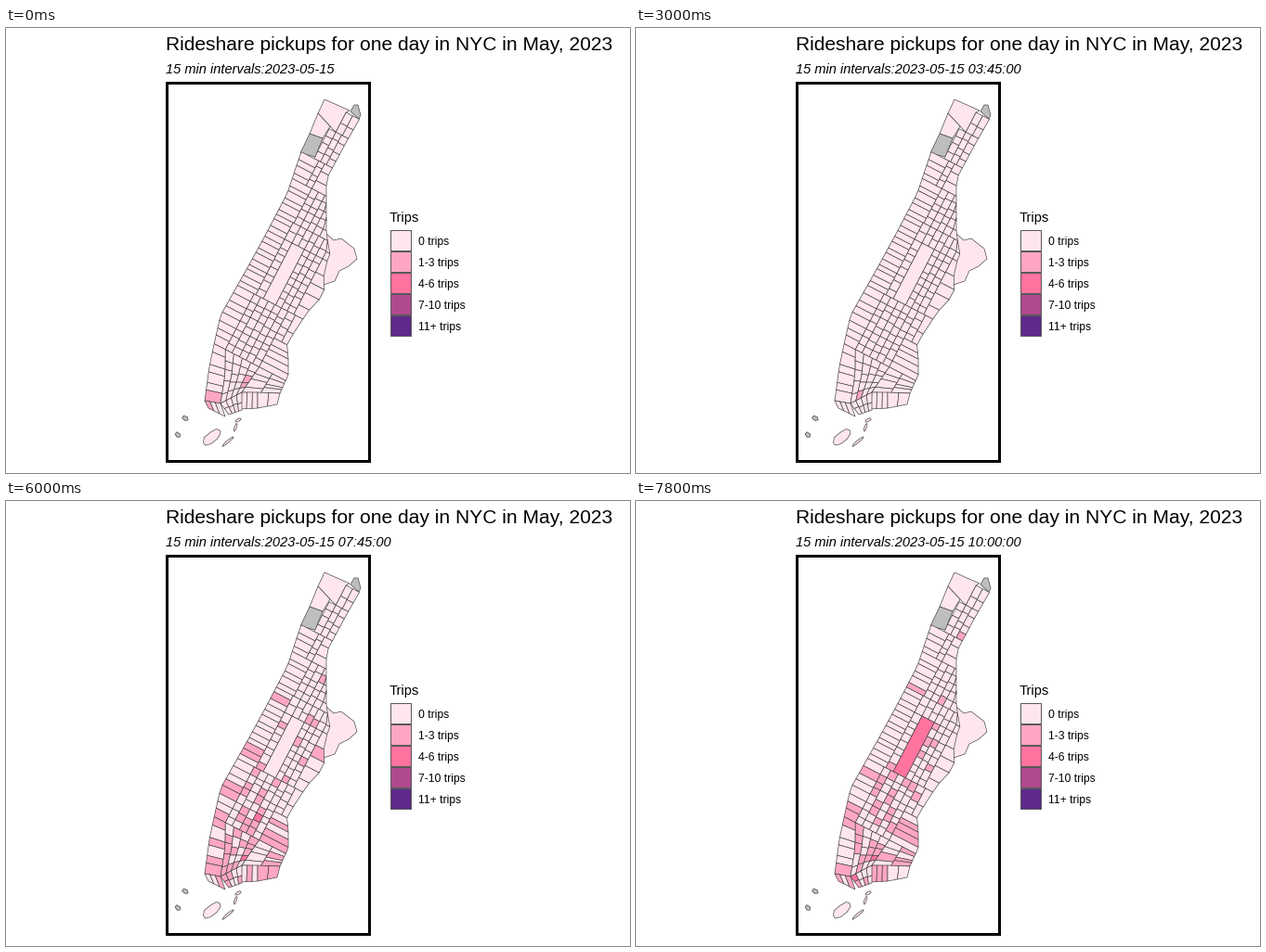
Write a matplotlib script that moves like this. It is 672x480 px and loops after 8 s.

```python
import numpy as np
import matplotlib.pyplot as plt
from matplotlib.animation import FuncAnimation
from matplotlib.collections import PolyCollection
from matplotlib.patches import Rectangle

W, H = 672, 480
FRAMES, STEP_MS = 40, 200
PT = 0.75                      # points per pixel at 96 dpi
FILLS = np.array(["#FFE6ED", "#FFA6C4", "#FF739F", "#B04A8F", "#5F298C", "#BEBEBE"])
LABELS = ["0 trips", "1-3 trips", "4-6 trips", "7-10 trips", "11+ trips"]
BINS = [1, 4, 7, 11]           # lowest trip count of each darker class
GREY = 5

rng = np.random.default_rng(15)
cells, greys = [], []

# Street grid: u runs across the island, v runs downtown.
ORIGIN = np.array([308.0, 232.0])
ACROSS = np.array([0.888, 0.459])
DOWN = np.array([-0.459, 0.888])


def shore(*pts):
    """Turn a shoreline into a function u(v)."""
    rel = np.array(pts) - ORIGIN
    u, v = rel @ ACROSS, rel @ DOWN
    return lambda at: np.interp(at, v, u)


west = shore((343, 77), (327, 114), (317, 136), (303, 178), (280, 222),
             (262, 255), (231, 310), (222, 350), (214, 402))
east = shore((382, 96), (367, 122), (345, 163), (345, 200), (345, 222), (349, 243), (342, 262),
             (343, 287), (325, 306), (306, 335), (301, 345), (304, 352), (304, 375), (295, 394))


def spot(u, v):
    return ORIGIN + u * ACROSS + v * DOWN


def add(pts, grey=False):
    if grey:
        greys.append(len(cells))
    cells.append(np.array(pts, float))


def blob(x, y, rx, ry, tilt, grey=False, sides=9):
    """A slightly uneven ellipse."""
    a = np.linspace(0, 2 * np.pi, sides, endpoint=False)
    r = rng.uniform(0.85, 1.1, sides)
    px, py = rx * r * np.cos(a), ry * r * np.sin(a)
    c, s = np.cos(np.radians(tilt)), np.sin(np.radians(tilt))
    add(np.c_[x + px * c - py * s, y + px * s + py * c], grey)


def breaks(a, b, step):
    """Uneven row limits from a to b."""
    n = max(1, round((b - a) / step))
    rows = np.linspace(a, b, n + 1)
    rows[1:-1] += rng.uniform(-0.2, 0.2, n - 1) * step
    return rows


def edge_at(edge, v):
    return edge(v) if callable(edge) else np.clip(edge, west(v), east(v))


def zone(v0, v1, edges, step=8.2, west_step=6.8, east_step=10):
    for left, right in zip(edges, edges[1:]):
        size = west_step if left is west else east_step if right is east else step
        rows = breaks(v0, v1, size)
        for a, b in zip(rows, rows[1:]):
            la, lb = edge_at(left, a), edge_at(left, b)
            ra, rb = edge_at(right, a), edge_at(right, b)
            if max(ra - la, rb - lb) > 1.5:
                add([spot(la, a), spot(ra, a), spot(rb, b), spot(lb, b)])


def along(pts, t):
    pts = np.array(pts, float)
    s = np.r_[0, np.cumsum(np.hypot(*np.diff(pts, axis=0).T))]
    return np.array([np.interp(t * s[-1], s, pts[:, i]) for i in (0, 1)])


def patch(left, right, rows, cols):
    """Fill the space between two polylines with rows x cols cells."""
    def at(r, c):
        return along(left, r) * (1 - c) + along(right, r) * c
    for i in range(cols):
        c0, c1 = i / cols, (i + 1) / cols
        ts = breaks(0, 1, 1 / rows)
        for a, b in zip(ts, ts[1:]):
            add([at(a, c0), at(a, c1), at(b, c1), at(b, c0)])


def build():
    # river island, under the shore cells
    add([(345, 222), (353, 229), (361, 227), (375, 238), (378, 249), (369, 257),
         (359, 262), (354, 273), (342, 277), (340, 262)])

    # northern end
    add([(336, 92), (343, 77), (370, 89), spot(-13, -152), spot(-13, -128), (349, 106)])
    add([(336, 92), (349, 106), (341, 119), (327, 114)])
    zone(-152, -128, [-13, -5, east], 11)
    zone(-128, -92, [-21, -13, -6, east], 9)
    add([(327, 114), (341, 119), (333, 139), (317, 135)], True)
    add([(371, 90), (375, 83), (379, 83), (382, 94), (380, 98)], True)

    # regular grid around the park
    zone(-92, -62, [west, -15, -8, east], 7, 8)
    zone(-62, -20, [west, -8, 0, 8, 15, 23, east])
    zone(-20, 0, [west, -9, 0, 7.5, 15, 22, 29, 37, east])
    zone(0, 67.5, [west, -9, 0])
    zone(0, 67.5, [0, 15], 67.5)
    park = len(cells) - 1
    zone(0, 67.5, [15, 22, 29, 37, east], east_step=13)
    zone(67.5, 135, [west, -11, -3, 6, 14, 22, 30], west_step=8.4)
    zone(67.5, 100, [30, 39, east], east_step=17)
    zone(100, 135, [30, east], east_step=7)

    # lower part
    corner, heel = (231, 405), (254, 393)
    inner = [spot(-11, 135), (236, 374), corner]
    centre = [spot(30, 135), heel]
    patch([spot(west(135), 135), (219, 365), (214, 402)], inner, 6, 1)
    patch(inner, centre, 5, 4)
    patch(centre, [spot(62, 135), (295, 394)], 4, 2)
    patch([heel, (253, 411)], [(271, 393), (271, 410)], 1, 3)
    patch([(271, 393), (271, 410)], [(295, 394), (292, 406)], 1, 2)
    patch([corner, (240, 417)], [heel, (254, 412)], 2, 4)
    patch([(214, 402), (218, 410)], [corner, (236, 419)], 1, 3)

    # harbour
    blob(222, 441, 12.5, 5.5, -42)
    blob(250, 423, 3.5, 1.5, -30)
    blob(247, 431, 4.5, 1.2, -70)
    blob(239, 446, 8, 1.2, -40)
    blob(193, 421, 3.5, 2.5, 30, True, 5)
    blob(185, 439, 3.5, 2.5, 45, True, 5)
    return park


park = build()
centres = np.array([c.mean(axis=0) for c in cells])
cu, cv = (centres - ORIGIN) @ ACROSS, (centres - ORIGIN) @ DOWN

# demand grows towards midtown and the lower west side
weight = 0.06 + 1 / (1 + np.exp(-(cv - 50) / 25)) + 0.9 * ((cv > 95) & (cu < 25))
weight[(cv < 100) & (cu > 36)] *= 0.4
weight[centres[:, 1] > 421] = 0
weight *= rng.gamma(1.4, 1, len(cells))
weight /= weight.mean()


def levels_at(k):
    """Trip class of every cell: a quiet night, then the morning rush."""
    rush = 0.36 / (1 + np.exp(-(k - 26) / 1.8)) * (1 - 0.025 * max(0, k - 32))
    draw = np.random.default_rng(700 + k)
    trips = np.minimum(draw.poisson(weight * (0.012 + rush)), 6)
    trips[park] = int(5 * (k / 39) ** 2 * np.cos(np.pi * (k - 39) / 16) ** 2)
    levels = np.searchsorted(BINS, trips, side="right")
    levels[greys] = GREY
    return levels


def caption(k):
    slot = k + (k >= 18)       # one quarter hour has no pickups
    clock = f" {slot // 4:02d}:{slot % 4 * 15:02d}:00" if slot else ""
    return "15 min intervals:2023-05-15" + clock


plt.rcParams["font.family"] = "Liberation Sans"
fig = plt.figure(figsize=(7, 5), dpi=96, facecolor="white")
ax = fig.add_axes([0, 0, 1, 1])
ax.set_xlim(0, W)
ax.set_ylim(H, 0)
ax.axis("off")


def write(x, y, text, px, **kw):
    return ax.text(x, y, text, fontsize=px * PT, color="black", va="baseline", **kw)


def box(x, y, w, h, fill, edge, px):
    ax.add_patch(Rectangle((x, y), w, h, fc=fill, ec=edge, lw=px * PT, joinstyle="miter", snap=False))


write(172, 24, "Rideshare pickups for one day in NYC in May, 2023", 21.06)
subtitle = write(172, 49, "", 14.6, style="italic")

box(173.5, 59.5, 218, 408, "white", "black", 3)
tracts = PolyCollection(cells, edgecolors="#404040", linewidths=0.65 * PT, zorder=2)
ax.add_collection(tracts, autolim=False)

write(413, 209, "Trips", 14.67)
for i, label in enumerate(LABELS):
    y = 218.5 + 23 * i
    box(414.5, y, 22, 22, FILLS[i], "#595959", 1)
    write(444, y + 15.7, label, 12.1)


def update(k):
    subtitle.set_text(caption(k))
    tracts.set_facecolor(list(FILLS[levels_at(k)]))
    return subtitle, tracts


anim = FuncAnimation(fig, update, frames=FRAMES, interval=STEP_MS, repeat=True, repeat_delay=0, blit=False)
plt.show()
```
